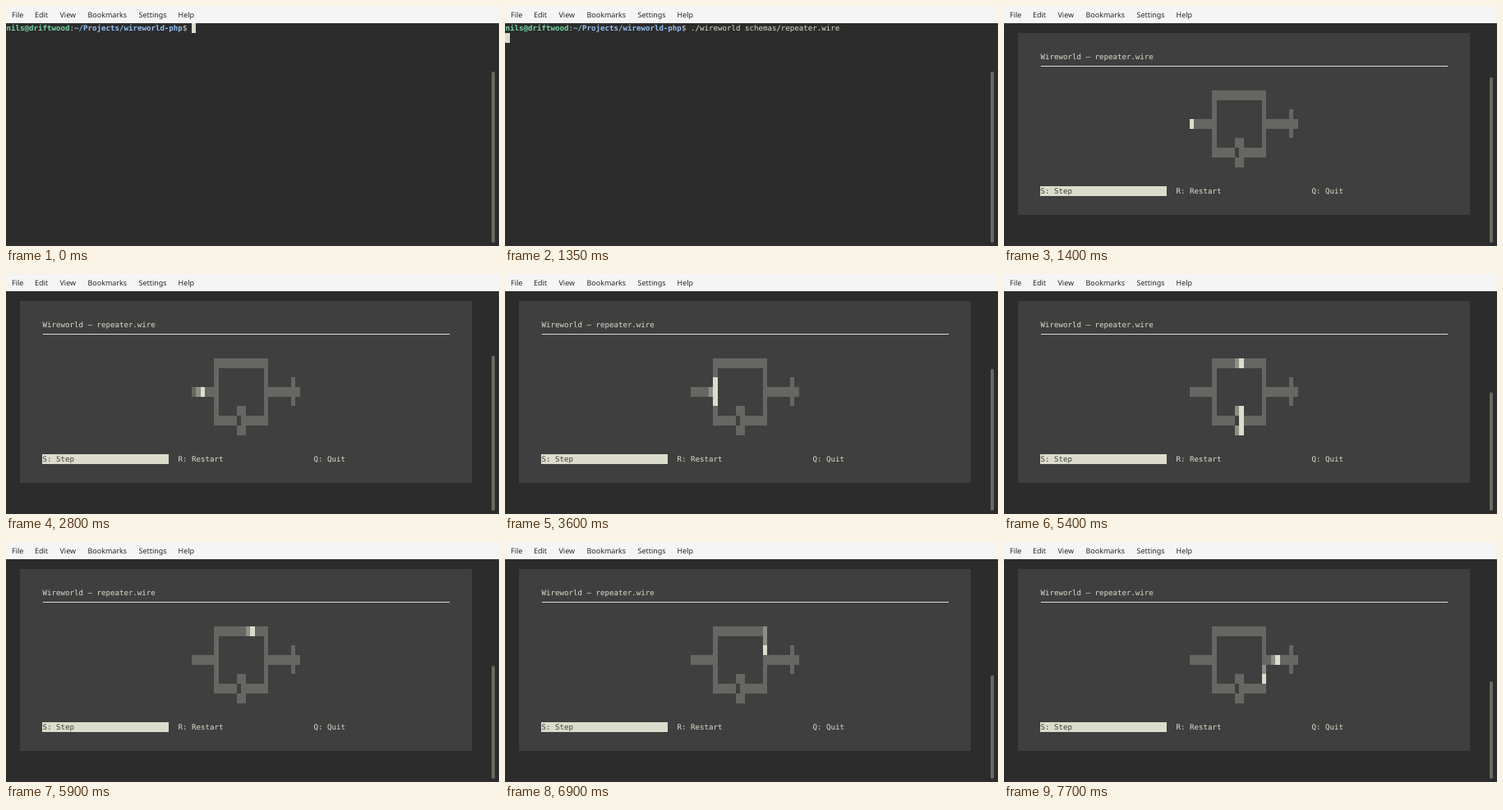
Write an HTML page that moves like this. It is 600 px wide and 293 px high and loops after 8 s.

```html
<!DOCTYPE html>
<html lang="en">
<head>
<meta charset="utf-8">
<title>Wireworld in a terminal</title>
<style>
  html, body { margin: 0; width: 100%; height: 100%; overflow: hidden; background: #2c2c2c; }
  svg { display: block; }
  text { white-space: pre; text-rendering: geometricPrecision; }
  rect { shape-rendering: crispEdges; }
  .menu { font: 8.96px "Noto Sans", "Open Sans", sans-serif; fill: #232627; }
  .mono { font: 9.136px "DejaVu Sans Mono", monospace; fill: #dcdccc; }
  .user { font-weight: bold; fill: #72d5a3; }
  .path { font-weight: bold; fill: #94bff3; }
  #bar { shape-rendering: auto; }
</style>
</head>
<body>
<svg id="stage" width="600" height="293" viewBox="0 0 600 293">
  <rect width="600" height="293" fill="#2c2c2c"/>
  <rect width="600" height="21" fill="#f5f5f5"/>
  <g id="menu"></g>
  <g id="shell"></g>
  <g id="game"></g>
  <rect id="bar" x="591" width="4" rx="2" fill="#6b6a60"/>
</svg>
<script>
const LOOP = 8000, TYPED = 100, ENTER = 1350, START = 1400;
const STEPS = [2550, 2800, 3050, 3350, 3600, 3850, 4100, 4350, 4650, 4900, 5150,
  5400, 5650, 5900, 6150, 6400, 6650, 6900, 7150, 7400, 7700];
const FG = '#dcdccc', PANEL = '#3f3f3f';
const WIRE = 1, TAIL = 2, HEAD = 3;
const COLOURS = { [WIRE]: '#666662', [TAIL]: '#8e8e86', [HEAD]: FG };
const MAP = [
  '     ############',
  '     #          #',
  '     #          #     #',
  '@###############'.slice(0, 6) + '          ########',
  '     #          #     #',
  '     #    ##    #',
  '     ##### ######',
  '          ##'
];

const $ = id => document.getElementById(id);
const [menu, shell, game, bar] = ['menu', 'shell', 'game', 'bar'].map($);

// Terminal grid to pixels
const colX = c => 0.5 + 5.5 * c;
const rowY = r => 21.45 + 11.67 * r;

function add(parent, tag, attrs, content = '') {
  const el = document.createElementNS('http://www.w3.org/2000/svg', tag);
  for (const key in attrs) el.setAttribute(key, attrs[key]);
  el.textContent = content;
  return parent.appendChild(el);
}

function block(parent, col, row, cols, rows, fill) {
  const x = Math.floor(colX(col) + 0.49), y = Math.round(rowY(row));
  const width = Math.floor(colX(col + cols) + 0.49) - x;
  const height = Math.round(rowY(row + rows)) - y;
  return add(parent, 'rect', { x, y, width, height, fill });
}

const write = (parent, col, row, str, cls = '') =>
  add(parent, 'text', { x: colX(col), y: rowY(row) + 9, class: 'mono ' + cls }, str);

const show = (el, on) => el.setAttribute('visibility', on ? 'inherit' : 'hidden');

// Menu bar
Object.entries({ File: 7, Edit: 35, View: 65.5, Bookmarks: 99.5, Settings: 161.5, Help: 209.5 })
  .forEach(([name, x]) => add(menu, 'text', { x, y: 13.8, class: 'menu' }, name));

// Shell prompt
write(shell, 0, 0, 'nils@driftwood', 'user');
write(shell, 14, 0, ':');
write(shell, 15, 0, '~/Projects/wireworld-php', 'path');
write(shell, 39, 0, '$');
const command = write(shell, 41, 0, './wireworld schemas/repeater.wire');
const cursors = [[41, 0], [75, 0], [0, 1]].map(([c, r]) => block(shell, c, r, 1, 1, FG));

// Game panel
block(game, 3, 1, 100, 19, PANEL);
write(game, 8, 3, 'Wireworld – repeater.wire');
add(game, 'rect', { x: 44.5, y: 73, width: 495, height: 1, fill: FG });
block(game, 8, 17, 28, 1, FG);
write(game, 8, 17, 'S: Step').style.fill = PANEL;
write(game, 38, 17, 'R: Restart');
write(game, 68, 17, 'Q: Quit');

const cells = [], first = [];
MAP.forEach((line, r) => [...line].forEach((ch, c) => {
  if (ch === ' ') return;
  cells.push({ c, r, el: block(game, 41 + c, 7 + r, 1, 1, COLOURS[WIRE]) });
  first.push(ch === '@' ? HEAD : WIRE);
}));

for (const cell of cells) {
  cell.near = cells.flatMap((o, i) =>
    o !== cell && Math.abs(o.c - cell.c) < 2 && Math.abs(o.r - cell.r) < 2 ? [i] : []);
}

function evolve(state) {
  return state.map((s, i) => {
    if (s === HEAD) return TAIL;
    if (s === TAIL) return WIRE;
    const heads = cells[i].near.filter(n => state[n] === HEAD).length;
    return heads === 1 || heads === 2 ? HEAD : WIRE;
  });
}

const generations = [first];
for (const _ of STEPS) generations.push(evolve(generations.at(-1)));

function draw(now) {
  const t = now % LOOP;
  const playing = t >= START;
  const step = playing ? STEPS.filter(s => s <= t).length : -1;

  show(shell, !playing);
  show(game, playing);
  show(command, t >= TYPED);
  const current = t < TYPED ? 0 : t < ENTER ? 1 : 2;
  cursors.forEach((el, i) => show(el, i === current));
  if (playing) cells.forEach(({ el }, i) => el.setAttribute('fill', COLOURS[generations[step][i]]));

  // The thumb shrinks as the scrollback grows
  const thumb = 1 / (0.00495 + 0.0001645 * step);
  bar.setAttribute('y', 289 - thumb);
  bar.setAttribute('height', thumb);
}

const began = performance.now();
function tick() {
  draw(performance.now() - began);
  requestAnimationFrame(tick);
}
tick();
</script>
</body>
</html>
```
